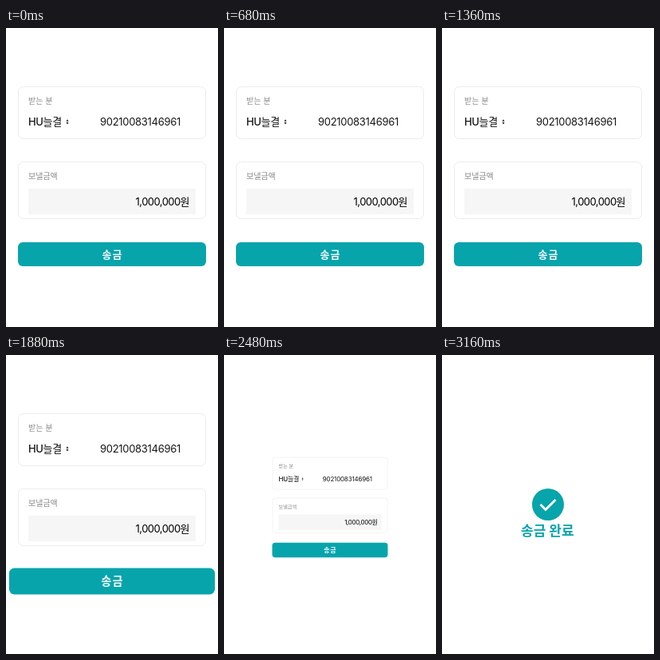
Write an HTML page with a canvas that moves like this. It is 266 by 374 pixels and loops after 4 s.

```html
<!DOCTYPE html>
<html lang="ko">
<head>
<meta charset="utf-8">
<title>송금</title>
<style>
  html, body { margin: 0; width: 100%; height: 100%; overflow: hidden; background: #fff; }
  canvas { display: block; width: 266px; height: 374px; }
</style>
</head>
<body>
<canvas id="stage"></canvas>
<script>
const W = 266, H = 374, LOOP = 4000;
const TEAL = '#07a4ac', INK = '#161616', GREY = '#8b8b8b', LINE = '#ececec';
const FONT = 'Inter, "Noto Sans CJK KR", "Noto Sans CJK", sans-serif';
const MID = 133;

const canvas = document.getElementById('stage');
const ctx = canvas.getContext('2d');
const ratio = window.devicePixelRatio || 1;
canvas.width = W * ratio;
canvas.height = H * ratio;

const progress = (t, from, to) => Math.min(1, Math.max(0, (t - from) / (to - from)));
const easeOut = p => 1 - (1 - p) ** 2;
const pulse = (t, from, to) => 1 + 0.095 * Math.sin(Math.PI * progress(t, from, to));

function text(str, x, y, size, color, { weight = 400, align = 'left', spacing = 0 } = {}) {
  ctx.font = `${weight} ${size}px ${FONT}`;
  ctx.letterSpacing = spacing + 'px';
  ctx.textAlign = align;
  ctx.fillStyle = color;
  ctx.fillText(str, x, y);
}

function box(x, y, w, h, r) {
  ctx.beginPath();
  ctx.roundRect(x, y, w, h, r);
}

function path(points) {
  ctx.beginPath();
  points.forEach(([x, y]) => ctx.lineTo(x, y));
}

function card(y, h, label) {
  box(15.5, y + 0.5, 235, h - 1, 6);
  ctx.fillStyle = '#fff';
  ctx.fill();
  ctx.strokeStyle = LINE;
  ctx.lineWidth = 1;
  ctx.stroke();
  text(label, 28, y + 22, 10, GREY);
}

function receiver() {
  card(73, 66, '받는 분');
  ctx.fillStyle = INK;
  path([[75.5, 116.7], [77, 114.3], [78.5, 116.7]]);
  ctx.fill();
  path([[75.5, 118], [77, 120.4], [78.5, 118]]);
  ctx.fill();
  text('HU늘결', 28, 121.5, 13, INK, { weight: 500, spacing: -0.35 });
  text('90210083146961', 118, 121.5, 13, INK, { spacing: -0.3 });
}

function amount() {
  card(167, 72, '보낼금액');
  ctx.fillStyle = '#f6f6f6';
  ctx.fillRect(28, 201, 210, 32);
  text('1,000,000원', 230, 222, 13, '#000', { align: 'right', spacing: -0.55 });
}

function button() {
  box(15, 268, 236, 30, 6);
  ctx.fillStyle = TEAL;
  ctx.fill();
  text('송금', MID + 0.5, 288, 13, '#fff', { weight: 700, align: 'center', spacing: 1 });
}

function check() {
  ctx.beginPath();
  ctx.arc(0, 0, 20, 0, Math.PI * 2);
  ctx.fillStyle = TEAL;
  ctx.fill();
  path([[-9.5, 0], [-3, 6.5], [9.5, -6]]);
  ctx.strokeStyle = '#fff';
  ctx.lineWidth = 3;
  ctx.stroke();
}

const parts = [
  { draw: receiver, cy: 106, from: 300, to: 675 },
  { draw: amount, cy: 203, from: 1010, to: 1355 },
  { draw: button, cy: 283, from: 1690, to: 2035 }
];

function form(t) {
  const p = progress(t, 2328, 2660);
  if (p === 1) return;
  const shrink = 1 - p ** 1.22;
  for (const { draw, cy, from, to } of parts) {
    const s = shrink * pulse(t, from, to);
    ctx.save();
    ctx.translate(MID, cy + (198 - cy) * p);
    ctx.scale(s, s);
    ctx.translate(-MID, -cy);
    draw();
    ctx.restore();
  }
}

function done(t) {
  const s = easeOut(progress(t, 2490, 2760));
  if (s === 0) return;
  ctx.save();
  ctx.translate(MID, 187);
  ctx.scale(s, s);
  check();
  ctx.restore();
  ctx.globalAlpha = progress(t, 3000, 3160);
  text('송금 완료', 132.3, 226, 17, TEAL, { weight: 700, align: 'center' });
  ctx.globalAlpha = 1;
}

function frame(now) {
  const t = now % LOOP;
  ctx.setTransform(ratio, 0, 0, ratio, 0, 0);
  ctx.fillStyle = '#fff';
  ctx.fillRect(0, 0, W, H);
  form(t);
  done(t);
}

let start;
function tick(now) {
  start ??= now;
  frame(now - start);
  requestAnimationFrame(tick);
}
requestAnimationFrame(tick);
</script>
</body>
</html>
```
